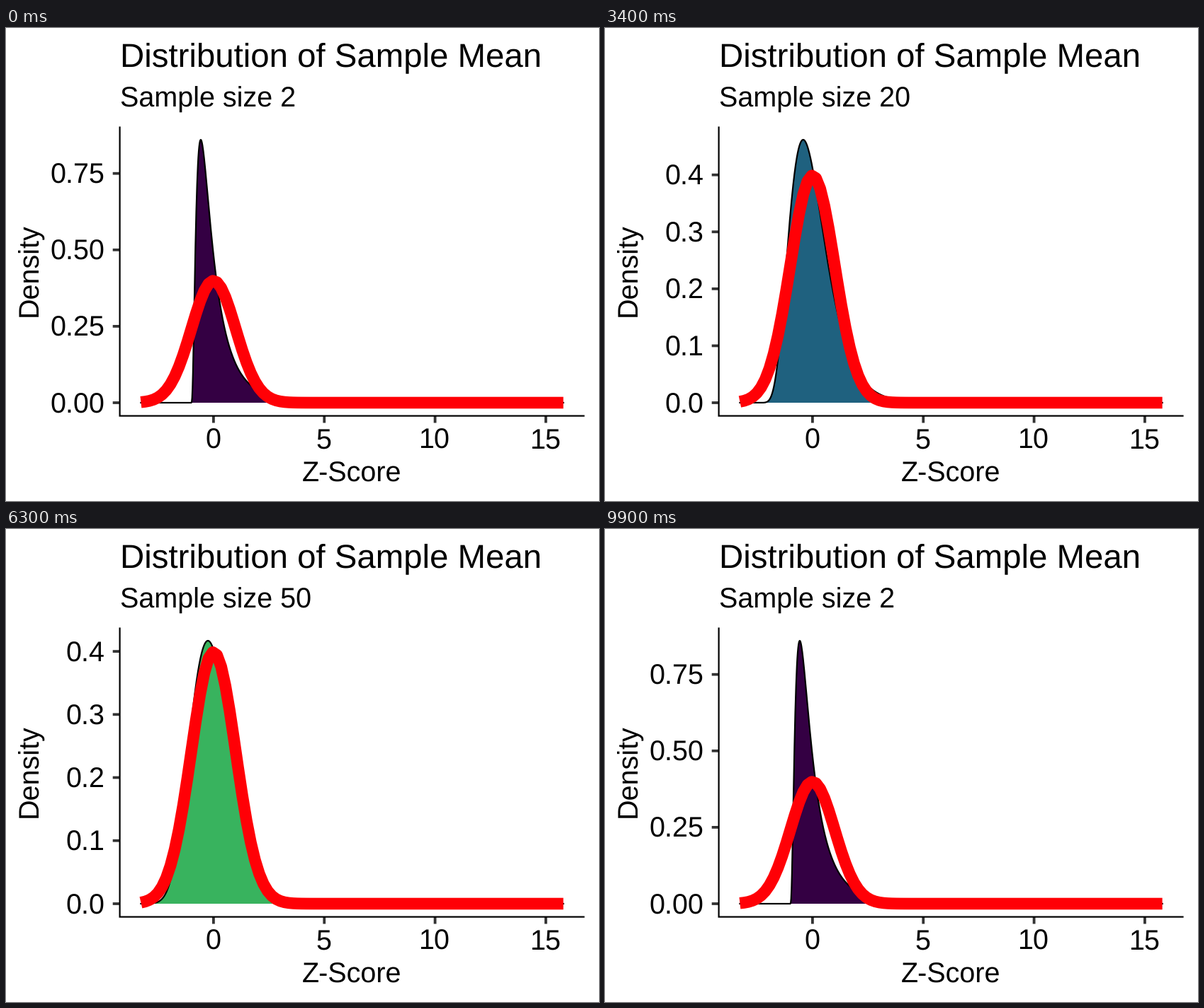
These frames come from a looping animation (837 px wide and 669 px high, 10000 ms). A matplotlib script:

```python
import numpy as np
import matplotlib.pyplot as plt
from matplotlib.animation import FuncAnimation
from matplotlib.patches import Polygon

plt.rcParams.update({"font.family": "Liberation Sans", "text.hinting": "none"})

W, H, FRAMES = 837, 669, 100
LEFT, RIGHT, TOP, BASE, BOTTOM = 160.6, 816.6, 139.4, 530, 548.6
PEAK_Y = 158
X0, UNIT = 292.9, 31.27
XMIN, XMAX = -3.277, 15.79
EM = 39.5
THIN, TICK, THICK = 2.2, 3.8, 16.6

SIZES = [2, 5, 10, 20, 30, 50, 100, 1000, 10000]
HOLD = 4
STEPS = np.array([8, 8, 7, 7, 6, 7, 7, 7, 7])
STARTS = HOLD + np.r_[0, np.cumsum(STEPS + HOLD)[:-1]]

# viridis as shown through a slightly darker display gamma
COLORS = plt.get_cmap("viridis")(np.linspace(0, 1, len(SIZES)))[:, :3] ** 1.2

grid = np.linspace(XMIN, XMAX, 1024)
bell_x = np.linspace(XMIN, XMAX, 101)
bell = np.exp(-bell_x ** 2 / 2) / np.sqrt(2 * np.pi)


def sample_mean(n):
    """Standardised log-normal density whose skew fades like 1/sqrt(n)."""
    s = 1.07 / np.sqrt(1 + n / 2.27)
    w = np.exp(s * s)
    mean, sd = np.sqrt(w), np.sqrt(w * (w - 1))
    x = np.maximum(mean + sd * (grid - .1 * s), 1e-9)
    return sd * np.exp(-(np.log(x) / s) ** 2 / 2) / (x * s * np.sqrt(2 * np.pi))


CURVES = [sample_mean(n) for n in SIZES]


def px(x):
    return X0 + UNIT * np.asarray(x)


def breaks(top):
    """Pick the tick step that best balances simplicity, coverage and density."""
    lo, hi = -.05 * top, 1.05 * top
    best = (-9, 0)
    for i, q in enumerate((1, 5, 2, 2.5, 4, 3)):
        for scale in (.01, .1):
            step = q * scale
            for k in range(2, 12):
                end = step * (k - 1)
                cover = 1 - .5 * ((hi - end) ** 2 + lo ** 2) / (.1 * (hi - lo)) ** 2
                ratio = (max(end, hi) - lo) / step / 4
                score = (.25 * (1 - i / 5) + .2 * cover
                         + .5 * (2 - max(ratio, 1 / ratio)))
                best = max(best, (score, step))
    step = best[1]
    digits = 1 if abs(step * 10 - round(step * 10)) < 1e-6 else 2
    ticks = np.arange(0, hi, step)
    return ticks, [f"{t:.{digits}f}" for t in ticks]


def pose(i):
    """State left, state reached, progress and labelled state."""
    k = np.searchsorted(STARTS, i, side="right") - 1
    if k < 0:
        return 0, 0, 0, 0
    nxt, done, n = (k + 1) % len(SIZES), i - STARTS[k] + 1, STEPS[k]
    return k, nxt, min(done / n, 1), k if done <= (n + 1) // 2 else nxt


fig = plt.figure(figsize=(W / 72, H / 72), dpi=72, facecolor="white")
ax = fig.add_axes([0, 0, 1, 1])
ax.set_xlim(0, W)
ax.set_ylim(H, 0)
ax.axis("off")


def label(x, y, s, size=EM, **kw):
    return ax.text(x, y, s, fontsize=size, color="black",
                   **{"va": "baseline", "ha": "left", **kw})


def stroke(x, y, color="black", width=THIN, **kw):
    return ax.plot(x, y, color=color, lw=width, snap=False,
                   **{"solid_capstyle": "butt", **kw})[0]


label(LEFT, 54.5, "Distribution of Sample Mean", EM * 1.2)
subtitle = label(LEFT, 112, "")
label(488, 642, "Z-Score", ha="center")
label(44.5, 342.5, "Density", ha="center", rotation=90, rotation_mode="anchor")

for v in (0, 5, 10, 15):
    stroke([px(v)] * 2, [BOTTOM, BOTTOM + 9.9], "#333333", TICK)
    label(px(v) - .4, 595, str(v), ha="center")
y_ticks = stroke([], [], "#333333", TICK)
y_labels = [label(139.5, 0, "", ha="right") for _ in range(12)]
stroke([LEFT, LEFT, RIGHT], [TOP, BOTTOM, BOTTOM], solid_joinstyle="miter")

area = ax.add_patch(Polygon([(0, 0), (1, 1), (1, 0)], lw=0, zorder=3))
outline = stroke([], [], zorder=4, solid_capstyle="projecting")
red = stroke([], [], "#ff0006", THICK, zorder=5, solid_joinstyle="round")


def draw(i):
    a, b, u, named = pose(i)
    curve = CURVES[a] * (1 - u) + CURVES[b] * u
    top = max(curve.max(), bell.max())

    def py(v):
        return BASE - (BASE - PEAK_Y) * np.asarray(v) / top

    xs, ys = px(grid), py(curve)
    area.set_xy(np.column_stack([np.r_[xs, xs[-1], xs[0]],
                                 np.r_[ys, BASE, BASE]]))
    area.set_facecolor(COLORS[a] * (1 - u) + COLORS[b] * u)
    outline.set_data(xs, ys)
    red.set_data(px(bell_x), py(bell))
    subtitle.set_text(f"Sample size {SIZES[named]}")

    ticks, names = breaks(top)
    ty = py(ticks)
    y_ticks.set_data(np.tile([LEFT - 9.9, LEFT, np.nan], len(ty)),
                     np.repeat(ty, 3))
    for text in y_labels:
        text.set_text("")
    for text, name, y in zip(y_labels, names, ty):
        text.set_text(name)
        text.set_y(y + 14.2)
    return []


anim = FuncAnimation(fig, draw, frames=FRAMES, interval=100, repeat=True,
                     repeat_delay=0, init_func=lambda: draw(0))
plt.show()
```
